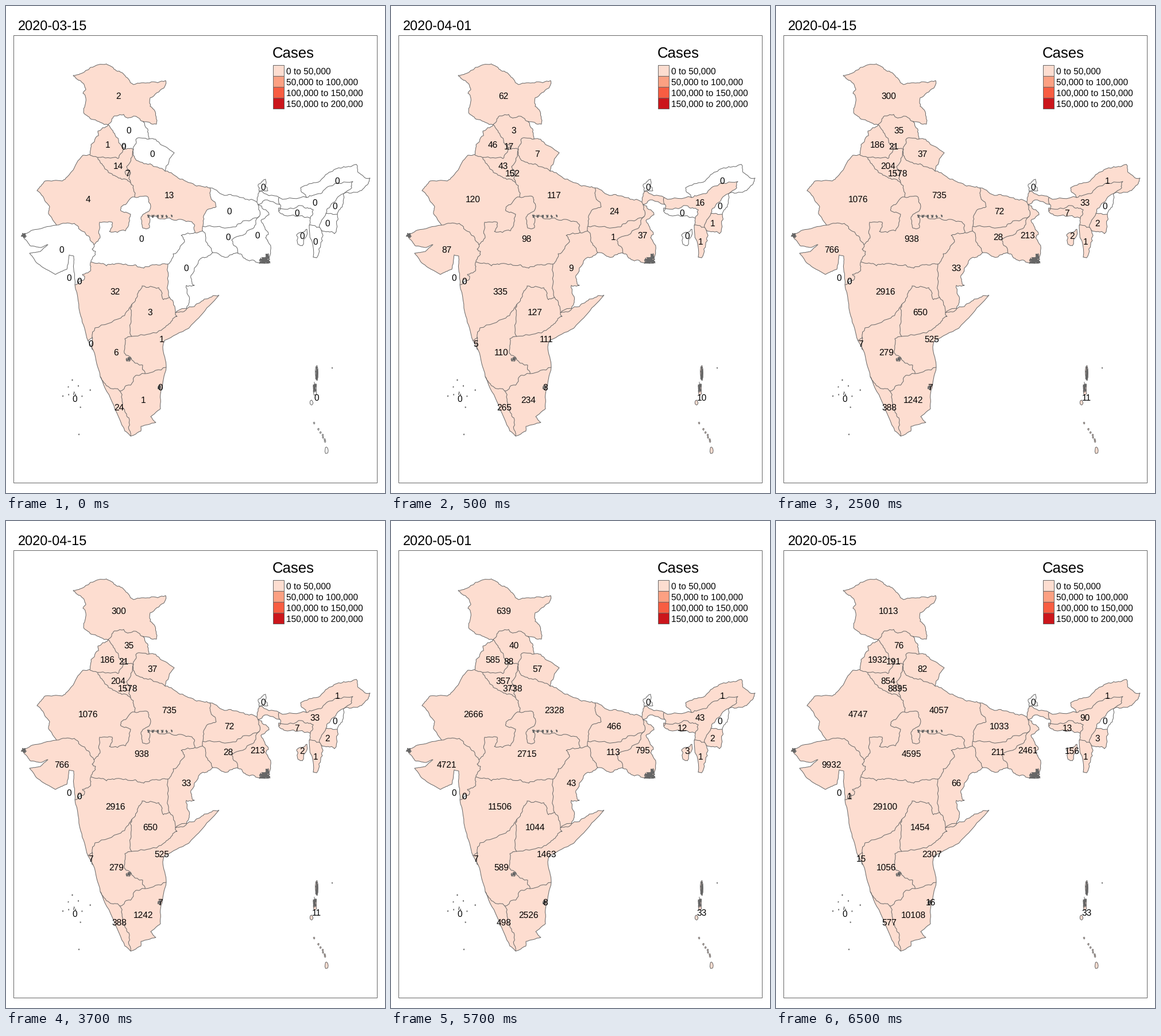
Recreate the animation shown at these times as a matplotlib script. Size 660 by 849 pixels, loop 8 s.

```python
import numpy as np
import matplotlib.pyplot as plt
from matplotlib.animation import FuncAnimation
from matplotlib.collections import LineCollection
from matplotlib.patches import Polygon, Rectangle

W, H, DPI = 660, 849, 64
PX = 72 / DPI
GREY = "#666666"
SHADES = ["#FDDDD0", "#FCA082", "#F85D42", "#CB161C"]
DATES = ["2020-03-15", "2020-04-01", "2020-04-15", "2020-05-01", "2020-05-15"]
BAND = 50000

plt.rcParams["font.family"] = "Liberation Sans"
plt.rcParams["text.hinting"] = "none"
rng = np.random.default_rng(15)
lines = []
regions = []

fig = plt.figure(figsize=(W / DPI, H / DPI), dpi=DPI, facecolor="white")
ax = fig.add_axes([0, 0, 1, 1])
ax.set(xlim=(0, W), ylim=(H, 0))
ax.axis("off")


def box(x, y, w, h, face):
    ax.add_patch(Rectangle((x, y), w, h, fc=face, ec=GREY, lw=PX))


def write(x, y, text, size, **style):
    return ax.text(x, y, text, fontsize=size * PX, color="black", va="baseline", zorder=5, **style)


def arc(*xy, rough=0.2):
    """Border through key points, crinkled by midpoint displacement."""
    pts = np.reshape(xy, (-1, 2)).astype(float)
    for _ in range(3):
        step = np.diff(pts, axis=0)
        length = np.hypot(*step.T)[:, None] + 1e-6
        normal = step[:, ::-1] * [1, -1] / length
        shift = rng.uniform(-rough, rough, length.shape) * np.minimum(length, 12)
        out = np.empty((2 * len(pts) - 1, 2))
        out[::2] = pts
        out[1::2] = pts[:-1] + step / 2 + normal * shift
        pts = out
    lines.append(pts)
    return pts


def coast(*xy):
    return arc(*xy, rough=0.07)


def blob(x, y, rx, ry, n=9):
    angle = np.linspace(0, 2 * np.pi, n + 1)
    r = rng.uniform(0.75, 1.15, n)
    r = np.append(r, r[0])
    pts = np.c_[x + rx * r * np.cos(angle), y + ry * r * np.sin(angle)]
    lines.append(pts)
    return pts


def thicket(x, y, w, h):
    """Dense tangle of tiny creeks and islets."""
    n = 6 + w * h // 4
    lines.append(np.c_[x + w * rng.random(n), y + h * rng.random(n)])


def ring(*arcs):
    """Chain arcs into one outline, turning each to meet the last."""
    def gap(p, q):
        return np.hypot(*(p - q))

    first, second = arcs[:2]
    ends = second[[0, -1]]
    if min(gap(first[0], e) for e in ends) < min(gap(first[-1], e) for e in ends):
        first = first[::-1]
    chain = [first]
    for a in arcs[1:]:
        end = chain[-1][-1]
        chain.append(a if gap(a[0], end) <= gap(a[-1], end) else a[::-1])
    return np.vstack(chain)


def region(x, y, counts, *outlines):
    """Fill the outlines and label them; the last count holds to the end."""
    patches = [ax.add_patch(Polygon(o, lw=0, ec="none", zorder=2)) for o in outlines]
    label = write(x, y + 5, "", 15.5, ha="center")
    regions.append((patches, label, counts))


# North
jk_out = arc(178, 207, 152, 198, 135, 185, 139, 161, 134, 152, 139, 145, 132, 133, 117, 121,
             130, 118, 147, 107, 175, 101, 188, 110, 205, 119, 222, 137, 250, 134, 278, 130,
             275, 143, 251, 160, 251, 175, 258, 181, 262, 206, 238, 201, rough=0.15)
jk_hp = arc(178, 207, 187, 193, 205, 189, 211, 195, 222, 192, 238, 201)
hp_out = arc(238, 201, 247, 215, 249, 232)
pb_hp = arc(178, 207, 190, 225, 205, 250)
hp_hr = arc(205, 250, 222, 250)
hp_uk = arc(222, 250, 226, 233, 249, 232)
pb_out = arc(178, 207, 160, 218, 161, 226, 148, 242, 146, 259)
pb_rj = arc(146, 259, 160, 264)
pb_hr = arc(160, 264, 195, 266, 205, 250)
hr_rj = arc(160, 264, 168, 277, 178, 290, 195, 299, 203, 302, 217, 308)
hr_up = arc(217, 308, 210, 280, 222, 250)
uk_out = arc(249, 232, 262, 235, 293, 256, 277, 288)
uk_up = arc(222, 250, 225, 266, 251, 275, 277, 288)
up_out = arc(277, 288, 303, 302, 332, 314, 355, 317)
up_br = arc(355, 317, 357, 335, 366, 350, 348, 359, 343, 384)
up_jh = arc(343, 384, 342, 392)
up_cg = arc(342, 392, 329, 395)
up_mp = arc(329, 395, 328, 381, 305, 372, 272, 371, 247, 364, 250, 386, 238, 387,
            237, 366, 252, 349, 248, 334, 224, 333)
rj_up = arc(217, 308, 224, 333)
rj_mp = arc(224, 333, 202, 349, 200, 357, 217, 363, 208, 392, 180, 393, 185, 377, 163, 377,
            164, 402, 153, 416)
rj_out = arc(146, 259, 134, 260, 114, 289, 98, 305, 68, 305, 54, 322, 66, 335, 76, 350,
             74, 362, 88, 382, rough=0.1)
rj_gj = arc(88, 382, 119, 379, 137, 394, 153, 416)

# West and centre
gj_out = coast(88, 382, 45, 391, 27, 400, 35, 408, 42, 418, 60, 421, 73, 416, 60, 428, 41, 431,
               55, 449, 86, 468, 106, 459, 110, 434, 118, 436, 118, 460, 120, 486)
gj_mp = arc(153, 416, 150, 424, 156, 428, 148, 446)
gj_mh = arc(148, 446, 147, 462, 133, 468, 137, 474, 120, 486)
mh_coast = coast(120, 486, 130, 540, 143, 584)
mh_ga = arc(143, 584, 150, 577)
ga_coast = coast(143, 584, 152, 600)
ga_ka = arc(150, 577, 152, 600)
mh_mp = arc(148, 446, 175, 453, 192, 449, 225, 451, 240, 457, 255, 451, 282, 450)
mh_cg = arc(282, 450, 281, 490, 285, 508)
mh_tg = arc(219, 520, 230, 500, 237, 488, 266, 491, 274, 512, 285, 508)
mh_ka = arc(150, 577, 155, 561, 200, 544, 219, 520)
mp_cg = arc(329, 395, 305, 400, 311, 411, 291, 432, 282, 450)
cg_jh = arc(342, 392, 349, 412, 360, 430)
cg_out = arc(360, 430, 343, 438, 322, 470, 328, 487, 314, 487, 319, 514, 312, 531, 295, 535)
tg_cg = arc(285, 508, 295, 535)

# South
ka_tg = arc(219, 520, 218, 550, 219, 576)
tg_ap = arc(219, 576, 262, 570, 282, 556, 298, 541, 295, 535)
ka_ap = arc(219, 576, 207, 580, 206, 605, 220, 618, 238, 626, 242, 641)
ka_tn = arc(242, 641, 224, 646, 217, 661, 198, 671)
ka_kl = arc(198, 671, 180, 665, 164, 646)
ka_coast = coast(152, 600, 164, 646)
kl_coast = coast(164, 646, 188, 697, 207, 741, 217, 750)
kl_tn = arc(198, 671, 203, 700, 214, 718, 217, 750)
tn_coast = coast(217, 750, 235, 741, 235, 733, 261, 726, 252, 716, 269, 702, 270, 670, 279, 630)
ap_tn = arc(242, 641, 279, 630)
ap_coast = coast(279, 630, 273, 594, 276, 583, 318, 562, 338, 541, 371, 504)
ap_inner = arc(371, 504, 345, 511, 328, 524, 295, 535)

# East
br_out = arc(355, 317, 385, 330, 410, 334, 437, 342)
br_wb = arc(437, 342, 441, 367)
br_jh = arc(343, 384, 362, 385, 400, 385, 412, 375, 441, 367)
jh_wb = arc(441, 367, 430, 388, 393, 408, 404, 431)
jh_out = arc(360, 430, 385, 438, 404, 431)
wb_out = arc(404, 431, 418, 442, 441, 448, 460, 448, 458, 414, 452, 404, 457, 398, 444, 374,
             458, 364, 439, 346, 452, 338, 477, 346)
wb_north = arc(437, 342, 441, 323, 476, 334)
wb_as = arc(476, 334, 477, 346)
sikkim = arc(441, 323, 439, 312, 452, 302, 456, 322, 441, 323)

# North-east
as_north = arc(476, 334, 524, 334)
as_ar = arc(524, 334, 545, 327, 563, 314, 604, 306, 602, 317, 588, 327)
ar_out = arc(524, 334, 513, 317, 544, 307, 566, 289, 588, 280, 610, 276, 613, 290, 634, 300,
             629, 312, 615, 323, 588, 327)
as_nl = arc(588, 327, 565, 348, 557, 362)
nl_out = arc(588, 327, 587, 345, 577, 363)
nl_mn = arc(557, 362, 577, 363)
as_mn = arc(557, 362, 546, 386)
mn_out = arc(577, 363, 572, 397, 549, 391, 546, 386)
as_mz = arc(546, 386, 528, 382)
mz_out = arc(549, 391, 551, 409, 541, 439, 535, 438, 528, 382)
as_south = arc(528, 382, 530, 370)
as_ml = arc(530, 370, 535, 355, 515, 348, 475, 352, 475, 358)
ml_out = arc(475, 358, 490, 366, 530, 370)
as_west = arc(475, 358, 477, 346)
tripura = arc(524, 389, 506, 399, 508, 414, 516, 418, 524, 389)

# Islands
andaman = [blob(541, 640, 3, 12), blob(538, 668, 3, 12), blob(532, 692, 2.5, 4.5),
           blob(558, 775, 3, 6)]
andaman += [blob(538 + 18 * t + rng.normal(0, 2), 727 + 32 * t, 1.2, 1.6)
            for t in np.linspace(0, 1, 7) ** 0.6]
for x, y in rng.normal((122, 675), (15, 13), (11, 2)):
    blob(x, y, 0.7, 1, 5)
blob(127, 747, 0.7, 1, 5)
blob(568, 631, 0.7, 0.7, 5)

thicket(26, 396, 10, 8)
thicket(441, 438, 19, 11)
thicket(452, 431, 8, 10)
thicket(535, 655, 5, 20)
thicket(539, 629, 4, 24)
thicket(264, 661, 6, 8)
thicket(209, 612, 9, 8)
for x in range(246, 290, 8):
    thicket(x, 364, 4, 5)

region(196, 157, (2, 62, 300, 639, 1013), ring(jk_out, jk_hp))
region(214, 217, (0, 3, 35, 40, 76), ring(jk_hp, hp_out, hp_uk, hp_hr, pb_hp))
region(177, 242, (1, 46, 186, 585, 1932), ring(pb_out, pb_rj, pb_hr, pb_hp))
region(255, 258, (0, 7, 37, 57, 82), ring(hp_uk, uk_out, uk_up))
region(195, 279, (14, 43, 204, 357, 854), ring(pb_hr, hr_rj, hr_up, hp_hr))
region(143, 337, (4, 120, 1076, 2666, 4747), ring(rj_out, rj_gj, rj_mp, rj_up, hr_rj, pb_rj))
region(284, 330, (13, 117, 735, 2328, 4057),
       ring(up_out, up_br, up_jh, up_cg, up_mp, rj_up, hr_up, uk_up))
region(389, 358, (0, 24, 72, 466, 1033), ring(br_out, br_wb, br_jh, up_br))
region(448, 316, (0,), sikkim)
region(577, 305, (0, 0, 1), ring(as_ar, ar_out))
region(538, 343, (0, 16, 33, 43, 90),
       ring(as_north, as_ar, as_nl, as_mn, as_mz, as_south, as_ml, as_west, wb_as))
region(573, 349, (0,), ring(as_nl, nl_mn, nl_out))
region(507, 361, (0, 0, 7, 12, 13), ring(as_ml, ml_out))
region(560, 379, (0, 1, 2, 2, 3), ring(nl_mn, mn_out, as_mn))
region(539, 411, (0, 1), ring(as_mz, mz_out))
region(516, 401, (0, 0, 2, 3, 156), tripura)
region(438, 400, (0, 37, 213, 795, 2461), ring(br_wb, jh_wb, wb_out, wb_as, wb_north))
region(387, 403, (0, 1, 28, 113, 211), ring(br_jh, jh_wb, jh_out, cg_jh, up_jh))
region(236, 406, (0, 98, 938, 2715, 4595), ring(up_mp, rj_mp, gj_mp, mh_mp, mp_cg))
region(97, 425, (0, 87, 766, 4721, 9932), ring(gj_out, gj_mh, gj_mp, rj_gj))
region(314, 457, (0, 9, 33, 43, 66), ring(mp_cg, up_cg, cg_jh, cg_out, tg_cg, mh_cg))
region(110, 474, (0,))
region(190, 498, (32, 335, 2916, 11506, 29100),
       ring(mh_coast, mh_ga, mh_ka, mh_tg, mh_cg, mh_mp, gj_mh))
region(128, 480, (0, 0, 0, 0, 1), blob(128, 480, 3.5, 4.5))
region(251, 534, (3, 127, 650, 1044, 1454), ring(mh_tg, tg_cg, tg_ap, ka_tg))
region(271, 581, (1, 111, 525, 1463, 2307), ring(tg_ap, ap_inner, ap_coast, ap_tn, ka_ap))
region(192, 604, (6, 110, 279, 589, 1056),
       ring(ga_ka, ka_coast, ka_kl, ka_tn, ka_ap, ka_tg, mh_ka))
region(148, 589, (0, 5, 7, 7, 15), ring(mh_ga, ga_ka, ga_coast))
region(239, 687, (1, 234, 1242, 2526, 10108), ring(ka_tn, ap_tn, tn_coast, kl_tn))
region(197, 700, (24, 265, 388, 498, 577), ring(ka_kl, kl_coast, kl_tn))
region(269, 665, (0, 3, 7, 8, 16), blob(267, 665, 2.5, 3))
region(205, 245, (0, 17, 21, 88, 191), blob(205, 244, 2.5, 3))
region(212, 292, (7, 152, 1578, 3738, 8895), blob(212, 291, 5, 6))
region(120, 685, (0,))
region(541, 683, (0, 10, 11, 33), *andaman)
ax.add_collection(LineCollection(lines, colors=GREY, linewidths=PX, zorder=3))

box(13, 51, 633, 780, "none")
date = write(20.5, 42.5, "", 23.5)
write(464, 89.5, "Cases", 25.8)
for row, shade in enumerate(SHADES):
    top = 103 + 19 * row
    box(465, top, 19, 19, shade)
    write(488, top + 15.5, f"{row * BAND:,} to {(row + 1) * BAND:,}", 15.5)


def update(frame):
    stage = (frame + 3) // 4
    date.set_text(DATES[stage])
    for patches, label, counts in regions:
        count = counts[min(stage, len(counts) - 1)]
        label.set_text(str(count))
        for patch in patches:
            patch.set_facecolor(SHADES[min(count // BAND, 3)] if count else "white")


anim = FuncAnimation(fig, update, frames=16, init_func=lambda: update(0), interval=500, repeat=True)
plt.show()
```
